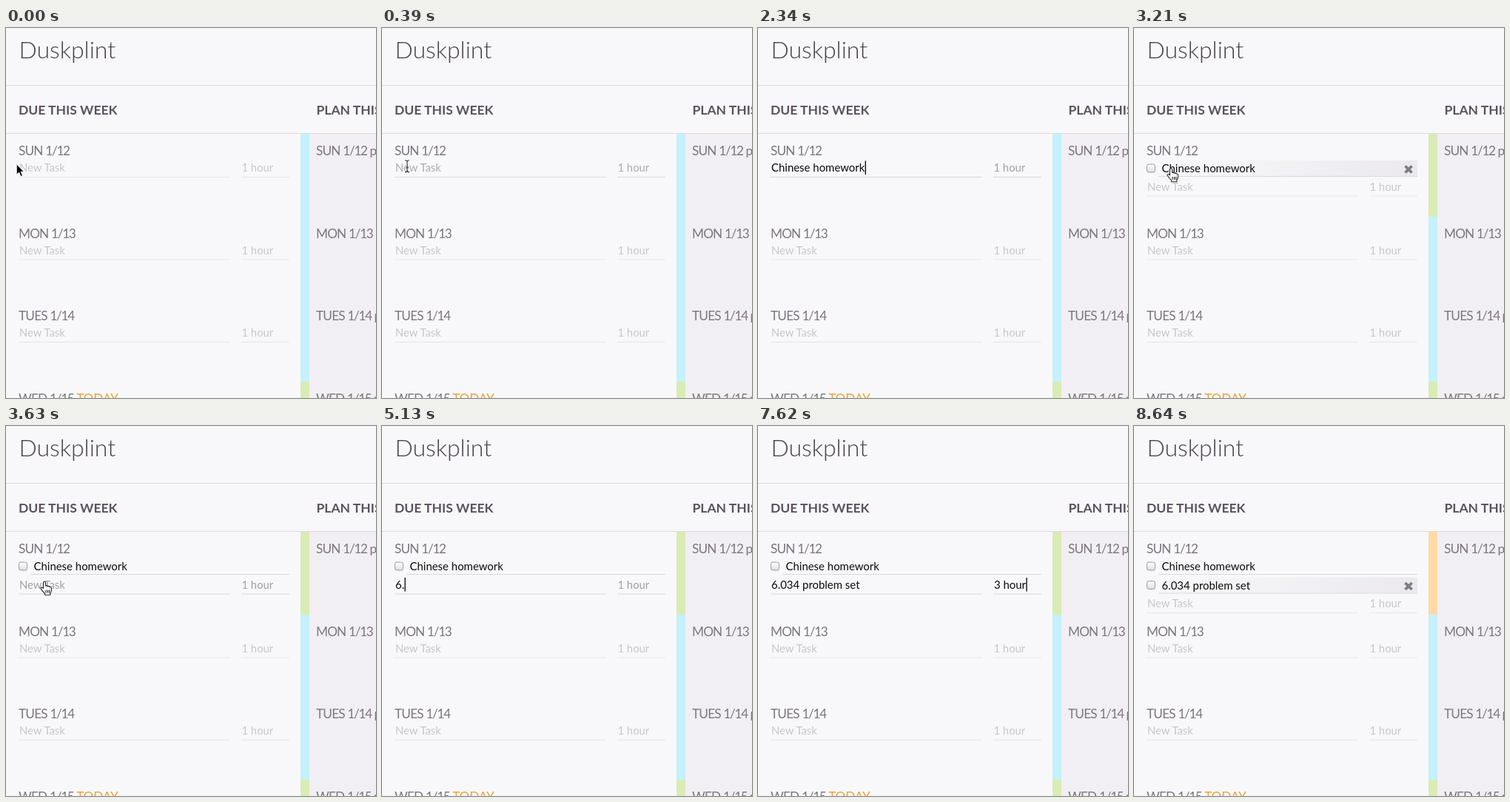
Recreate the animation shown at these times as an HTML page. Size 500 px wide and 500 px high, loop 8820 ms.

```html
<!DOCTYPE html>
<html lang="en">
<head>
<meta charset="utf-8">
<title>Week planner</title>
<style>
  html, body { margin: 0; width: 100%; height: 100%; overflow: hidden; background: #f8f8fa; }
  svg { display: block; width: 100vw; height: 100vh; }
  text { font-family: Lato, "Open Sans", sans-serif; font-size: 14.95px; white-space: pre; }
  .title { font-size: 32px; font-weight: 300; fill: #443e47; }
  .head { font-size: 17.5px; font-weight: 700; fill: #5b525d; }
  .day { font-size: 17.2px; letter-spacing: -.8px; fill: #7c767e; }
  .date { letter-spacing: -1.3px; }
  .today { letter-spacing: -.2px; fill: #e9a23b; }
  .hint { font-size: 14.8px; fill: #a0a0a3; }
  .entry { fill: #0c0c0c; }
</style>
</head>
<body>
<svg id="stage" viewBox="0 0 500 500">
  <defs>
    <linearGradient id="shade">
      <stop offset="0" stop-color="#ebe9ee" stop-opacity="0"/>
      <stop offset="1" stop-color="#ebe9ee"/>
    </linearGradient>
    <linearGradient id="box" x2="0" y2="1">
      <stop offset="0" stop-color="#fff"/>
      <stop offset="1" stop-color="#dedee0"/>
    </linearGradient>
  </defs>
</svg>
<script>
const LOOP = 8820;
const ADD_FIRST = 2460, ADD_SECOND = 8310;
const BLUE = [195, 241, 253], GREEN = [217, 236, 181], ORANGE = [254, 218, 166];

const stage = document.getElementById('stage');

function add(tag, attrs, parent = stage) {
  const node = document.createElementNS('http://www.w3.org/2000/svg', tag);
  for (const key in attrs) node.setAttribute(key, attrs[key]);
  return parent.appendChild(node);
}
function label(x, y, kind, content, parent) {
  const node = add('text', { x, y, class: kind }, parent);
  node.textContent = content;
  return node;
}
function span(parent, kind, content) {
  add('tspan', { class: kind }, parent).textContent = content;
}
const rect = (x, y, width, height, fill, parent) =>
  add('rect', { x, y, width, height, fill }, parent);
const rule = (x, y, width, parent, color = '#d9d9dc') => rect(x, y, width, 1, color, parent);
const show = (node, on) => node.setAttribute('opacity', +on);
const clamp = v => Math.max(0, Math.min(1, v));
const ramp = (t, from, to) => clamp((t - from) / (to - from));
const mix = (a, b, k) => `rgb(${a.map((v, i) => Math.round(v + (b[i] - v) * k))})`;

// Page frame
rect(0, 0, 500, 500, '#f8f8fa');
rect(410, 143, 90, 357, '#f2eff4');
rule(0, 77, 500, stage, '#dedae0');
rule(0, 142, 500, stage, '#dedae0');
label(17.5, 41, 'title', 'Duskplint');
label(17, 117, 'head', 'DUE THIS WEEK');
label(419.5, 117, 'head', 'PLAN THIS WEEK');
const sundayBar = rect(398, 143, 12, 112, '');
rect(398, 255, 12, 223, mix(BLUE, BLUE, 0));
rect(398, 478, 12, 22, mix(GREEN, GREEN, 0));

function inputRow(y) {
  const group = add('g', { transform: `translate(0 ${y})`, opacity: .55 });
  const task = label(18, 0, 'hint', 'New Task', group);
  const hours = label(318.5, 0, 'hint', '1 hour', group);
  rule(17, 7, 286, group);
  rule(318, 7, 65, group);
  return { group, task, hours };
}

function dayLabel(x, y, name, date, kind, note) {
  const node = label(x, y, 'day', name + ' ');
  span(node, 'date', date);
  span(node, kind, ' ' + note);
}
['SUN', 'MON', 'TUES', 'WED'].forEach((name, i) => {
  const y = 172 + 111.5 * i, date = '1/' + (12 + i);
  dayLabel(17, y, name, date, 'today', i === 3 ? 'TODAY' : '');
  dayLabel(419, y, name, date, '', 'plan');
  if (i === 1 || i === 2) inputRow(y + 22);
});

function taskItem(y, name) {
  const group = add('g', { transform: `translate(0 ${y})` });
  const hover = add('g', {}, group);
  rect(33, -16, 350, 21, 'url(#shade)', hover);
  add('path', { d: 'M366.5-8.5l9 9m0-9l-9 9', stroke: '#7d7c81', 'stroke-width': 3.8 }, hover);
  rule(33, 5, 350, group);
  add('rect', { x: 17.5, y: -11, width: 11, height: 11, rx: 2.8, fill: 'url(#box)', stroke: '#98989b' }, group);
  label(37.5, 0, 'entry', name, group);
  return { group, hover };
}
const first = taskItem(195, 'Chinese homework');
const second = taskItem(220.5, '6.034 problem set');
const row = inputRow(0);
const taskEntry = label(18, 0, 'entry', '', row.group);
const hoursEntry = label(319, 0, 'entry', '', row.group);
const caret = rect(0, -14.5, 1.3, 18.5, '#000', row.group);

// Mouse pointers, each with its hot spot at 0,0
const pointers = {
  arrow: add('path', {
    d: 'M0 0V14.5L3.4 11.4L5.8 16.8L8.3 15.7L5.9 10.5H10.3Z',
    fill: '#000', stroke: '#fff', 'stroke-width': 1
  }),
  beam: add('path', {
    d: 'M-3-8Q0-8 0-6Q0-8 3-8M0-6V6M-3 8Q0 8 0 6Q0 8 3 8M-1.5 2H1.5',
    fill: 'none', stroke: '#333', 'stroke-width': 1.1
  }),
  hand: add('path', {
    d: 'M-1.6 9V1.2Q-1.5-.2 0-.2Q1.4-.2 1.5 1.2V5.5Q3.4 4.6 4.2 6.2Q6 5.4 6.8 7Q9.2 6.4 9.3 8.8V12Q9 14 7.8 15.5V17.8H.6V16Q-2.2 13.3-4.8 9.6Q-5.4 7.6-3.6 7.6Q-2.4 8-1.6 9ZM2 11V15M4.4 11V15M6.6 11V15',
    fill: '#fff', stroke: '#222', 'stroke-width': 1.1, 'stroke-linejoin': 'round'
  })
};
const path = [
  [0, 14.2, 183.8], [150, 14.2, 183.8], [600, 50, 189],
  [3150, 50, 189], [3630, 52, 210.5], [3900, 55, 215], [LOOP, 55, 215]
];
function pointerAt(t) {
  const i = path.findIndex(p => p[0] > t);
  const [t0, x0, y0] = path[i - 1], [t1, x1, y1] = path[i];
  const k = (t - t0) / (t1 - t0), e = k * k * (3 - 2 * k);
  return [x0 + (x1 - x0) * e, y0 + (y1 - y0) * e];
}
function pointerKind(t, x) {
  if (t < 960) return x < 19 ? 'arrow' : 'beam';
  if (t >= 3150 && t < 4980) return t < 3720 ? 'hand' : 'beam';
  return '';
}

// Each entry: text and the moment each character arrives
const typing = {
  homework: ['Chinese homework', [960, 1020, 1050, 1110, 1200, 1320, 1380, 1470,
    1560, 1650, 1740, 1830, 1890, 2070, 2160, 2250]],
  problems: ['6.034 problem set', [4980, 5100, 5220, 5370, 5460, 5580, 5670, 5760,
    5850, 5940, 6030, 6090, 6180, 6270, 6360, 6450, 6540]],
  hours: ['3 hours', [7020, 7170, 7290, 7410, 7500, 7620, 7740]]
};
const typed = ([content, times], t) =>
  content.slice(0, times.filter(at => at <= t).length).replace(/ /g, '\u00a0');

const between = (t, a, b) => t >= a && t < b;

function draw(t) {
  const [x, y] = pointerAt(t);
  const kind = pointerKind(t, x);
  for (const name in pointers) {
    show(pointers[name], name === kind);
    pointers[name].setAttribute('transform', `translate(${x} ${y})`);
  }

  const count = (t >= ADD_FIRST) + (t >= ADD_SECOND);
  show(first.group, count > 0);
  show(second.group, count > 1);
  show(first.hover, ramp(t, ADD_FIRST, 2550) * (1 - ramp(t, 3330, 3540)));
  show(second.hover, ramp(t, ADD_SECOND, 8550));
  sundayBar.setAttribute('fill', count > 1
    ? mix(GREEN, ORANGE, ramp(t, ADD_SECOND, 8610))
    : mix(BLUE, GREEN, ramp(t, ADD_FIRST, 2550)));

  // The entry row slides down by one line for every added task
  const lit = count === 0 ? ramp(t, 180, 480) : count === 1 ? ramp(t, 3360, 3600) : 0;
  row.group.setAttribute('transform', `translate(0 ${[194, 219.5, 245][count]})`);
  show(row.group, .55 + .45 * lit);

  const inTask = between(t, 750, ADD_FIRST) || between(t, 4080, 6780);
  const inHours = between(t, 6780, ADD_SECOND);
  taskEntry.textContent = [typed(typing.homework, t), typed(typing.problems, t), ''][count];
  hoursEntry.textContent = inHours ? typed(typing.hours, t) : '';
  show(row.task, !inTask && !inHours);
  show(row.hours, !inHours);

  const field = inHours ? hoursEntry : taskEntry;
  const end = field.textContent ? field.getComputedTextLength() : 0;
  caret.setAttribute('x', (inHours ? 319 : 18) + end + .3);
  show(caret, (inTask || inHours) && !between(t, 4380, 4830) && t < 8100);
}

const start = performance.now();
function tick() {
  draw((performance.now() - start) % LOOP);
  requestAnimationFrame(tick);
}
tick();
</script>
</body>
</html>
```
